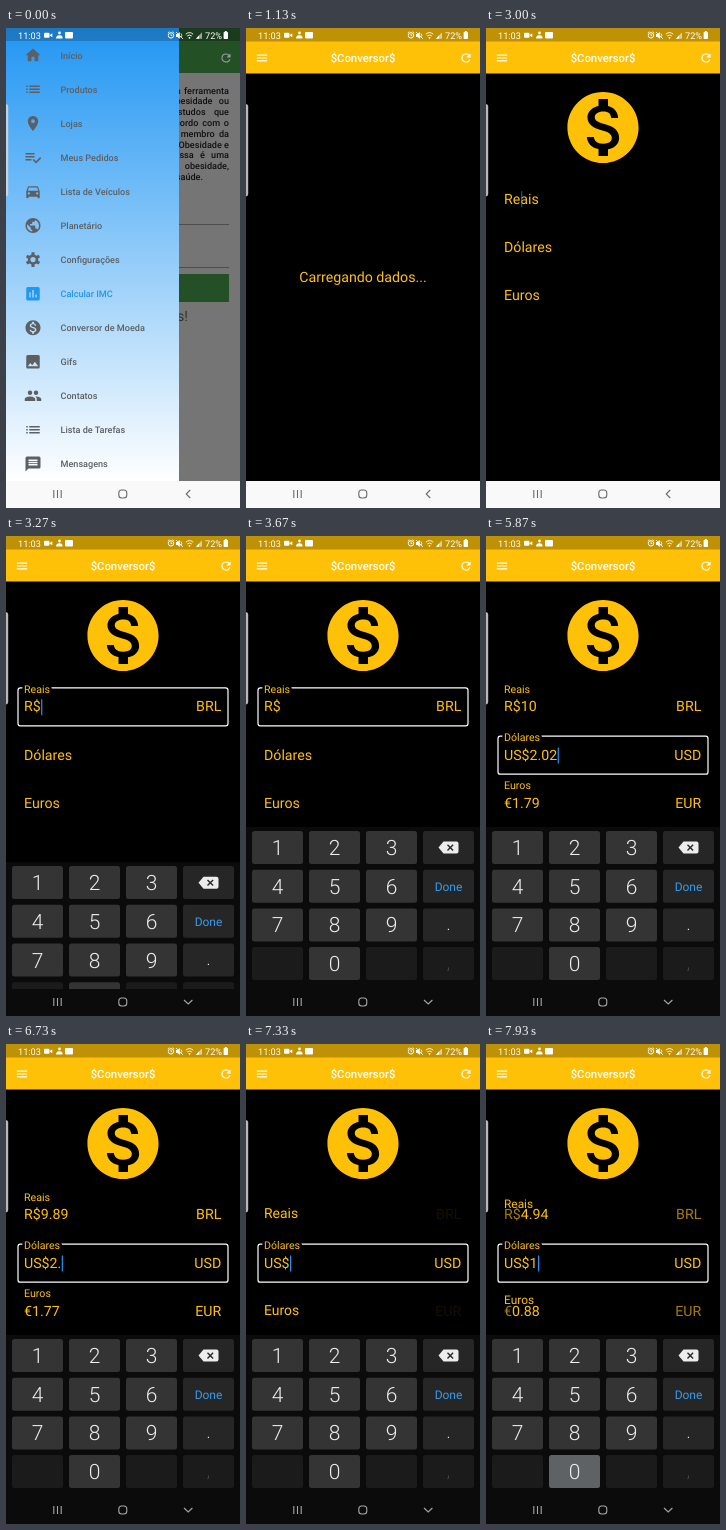
Write an HTML page that moves like this. It is 234 px wide and 480 px high and loops after 8000 ms.

```html
<!DOCTYPE html>
<html lang="pt">
<head>
<meta charset="utf-8">
<title>Conversor</title>
<style>
  html, body { margin: 0; width: 100%; height: 100%; overflow: hidden; background: #000; }
  svg { display: block; width: 100vw; height: 100vh; }
  text { font-family: Roboto, "Noto Sans", sans-serif; text-rendering: geometricPrecision; }
  .mid { text-anchor: middle; }
  .end { text-anchor: end; }
  .med { font-weight: 500; }
  .light { font-weight: 300; }
  .field text { fill: #ffc107; font-size: 14.2px; }
  .field .label { stroke: #000; stroke-width: 5px; stroke-linejoin: round; paint-order: stroke; }
  .hide { display: none; }
</style>
</head>
<body>
<svg id="stage" viewBox="0 0 234 480"></svg>
<script>
const LOOP = 8000, FPS = 15;
const AMBER = '#ffc107', BLUE = '#2196f3';

const listIcon = 'M3 11h2v2H3zM3 15h2v2H3zM3 7h2v2H3zM7 11h14v2H7zM7 15h14v2H7zM7 7h14v2H7z';
const coinIcon = 'M12 2C6.48 2 2 6.48 2 12s4.48 10 10 10 10-4.48 10-10S17.52 2 12 2zm1.41 16.09V20h-2.67v-1.93c-1.71-.36-3.16-1.46-3.27-3.4h1.96c.1 1.05.82 1.87 2.65 1.87 1.96 0 2.4-.98 2.4-1.59 0-.83-.44-1.61-2.67-2.14-2.48-.6-4.18-1.62-4.18-3.67 0-1.72 1.39-2.84 3.11-3.21V4h2.67v1.95c1.86.45 2.79 1.86 2.85 3.39H14.3c-.05-1.11-.64-1.87-2.22-1.87-1.5 0-2.4.68-2.4 1.64 0 .84.65 1.39 2.67 1.91s4.18 1.39 4.18 3.91c-.01 1.83-1.38 2.83-3.12 3.16z';
const refreshIcon = 'M17.65 6.35A7.95 7.95 0 0 0 12 4a8 8 0 1 0 7.73 10h-2.08A6 6 0 1 1 12 6c1.66 0 3.14.69 4.22 1.78L13 11h7V4z';
const menuIcon = 'M3 16h18v2H3zM3 11h18v2H3zM3 6h18v2H3z';

const items = [
  ['Início', 'M10 20v-6h4v6h5v-8h3L12 3 2 12h3v8z'],
  ['Produtos', listIcon],
  ['Lojas', 'M12 2C8.13 2 5 5.13 5 9c0 5.25 7 13 7 13s7-7.75 7-13c0-3.87-3.13-7-7-7zm0 9.5a2.5 2.5 0 0 1 0-5 2.5 2.5 0 0 1 0 5z'],
  ['Meus Pedidos', 'M2 10h12v2H2zM2 6h12v2H2zM2 14h8v2H2zM21.5 11.5L23 13l-7 7-4.5-4.5L13 14l3 3z'],
  ['Lista de Veículos', 'M3 12l2.1-6Q5.5 5 6.5 5h11q1 0 1.4 1L21 12v8q0 1-1 1h-1q-1 0-1-1v-1H6v1q0 1-1 1H4q-1 0-1-1zM5 11h14l-1.5-4.5h-11zM5 14.5a1.5 1.5 0 0 0 3 0 1.5 1.5 0 0 0-3 0zM16 14.5a1.5 1.5 0 0 0 3 0 1.5 1.5 0 0 0-3 0z'],
  ['Planetário', 'M12 2C6.48 2 2 6.48 2 12s4.48 10 10 10 10-4.48 10-10S17.52 2 12 2zm-1 17.93c-3.95-.49-7-3.85-7-7.93 0-.62.08-1.21.21-1.79L9 15v1c0 1.1.9 2 2 2zm6.9-2.54c-.26-.81-1-1.39-1.9-1.39h-1v-3c0-.55-.45-1-1-1H8v-2h2c.55 0 1-.45 1-1V7h2c1.1 0 2-.9 2-2v-.41c2.93 1.19 5 4.06 5 7.41 0 2.08-.8 3.97-2.1 5.39z'],
  ['Configurações', gearPath()],
  ['Calcular IMC', 'M19 3H5q-2 0-2 2v14q0 2 2 2h14q2 0 2-2V5q0-2-2-2zM9 17H7v-7h2zM13 17h-2V7h2zM17 17h-2v-4h2z'],
  ['Conversor de Moeda', coinIcon],
  ['Gifs', 'M21 19V5q0-2-2-2H5q-2 0-2 2v14q0 2 2 2h14q2 0 2-2zM8.5 13.5l2.5 3 3.5-4.5 4.5 6H5z'],
  ['Contatos', 'M13 8a3 3 0 1 1 6 0 3 3 0 0 1-6 0zM5 8a3 3 0 1 1 6 0 3 3 0 0 1-6 0zM8 13c-2.33 0-7 1.17-7 3.5V19h14v-2.5c0-2.33-4.67-3.5-7-3.5zM16 13l-1 .05c1.16.84 2 1.97 2 3.45V19h6v-2.5c0-2.33-4.67-3.5-7-3.5z'],
  ['Lista de Tarefas', listIcon],
  ['Mensagens', 'M20 2H4q-2 0-2 2v18l4-4h14q2 0 2-2V4q0-2-2-2zM18 14H6v-2h12zM18 11H6V9h12zM18 8H6V6h12z']
];

const about = [['é uma ferramenta', 1], ['obesidade ou', 4], ['estudos que', 6], ['acordo com o', 1.5],
  ['membro da', 2], ['Obesidade e', 0], ['Essa é uma', 4], ['obesidade,', 0]];

const fields = [
  { label: 'Reais', prefix: 'R$', suffix: 'BRL', floats: [3000, 7200, 7850] },
  { label: 'Dólares', prefix: 'US$', suffix: 'USD', floats: [4260] },
  { label: 'Euros', prefix: '€', suffix: 'EUR', floats: [4260, 7200, 7850] }
];

const values = [
  [0, '', '', ''], [4260, '1', '0.20', '0.18'], [4460, '10', '2.02', '1.79'],
  [6530, '9.89', '2.0', '1.77'], [6660, '9.89', '2.', '1.77'], [6860, '9.89', '2', '1.77'],
  [7200, '', '', ''], [7850, '4.94', '1', '0.88']
];

const caret = [[0, 0], [3000, .6], [3060, 1], [3660, 0], [4260, 1], [4860, 0], [5400, 1], [6200, 0], [6460, 1]];

const presses = [['1', 4130, 4260], ['0', 4330, 4460], ['del', 6460, 6530], ['del', 6600, 6660],
  ['del', 6800, 6860], ['del', 7130, 7200], ['1', 7730, 7860], ['0', 7930, 8000]];

const keys = ['1', '2', '3', 'del', '4', '5', '6', 'Done', '7', '8', '9', '.', '', '0', '', ','];

function gearPath() {
  let d = '';
  for (let i = 0; i < 6; i++) {
    [[-.3, 7], [-.2, 10], [.2, 10], [.3, 7]].forEach(([a, r]) => {
      const ang = i * Math.PI / 3 + a;
      d += (d ? 'L' : 'M') + (12 + r * Math.sin(ang)).toFixed(2) + ' ' + (12 - r * Math.cos(ang)).toFixed(2);
    });
  }
  return d + 'zM8.5 12a3.5 3.5 0 0 0 7 0 3.5 3.5 0 0 0-7 0z';
}

const rect = (x, y, w, h, fill, more = '') =>
  `<rect x="${x}" y="${y}" width="${w}" height="${h}" fill="${fill}" ${more}/>`;
const text = (x, y, str, size, fill, more = '') =>
  `<text x="${x}" y="${y}" font-size="${size}" fill="${fill}" ${more}>${str}</text>`;
const icon = (cx, cy, size, d, fill) =>
  `<path d="${d}" fill="${fill}" fill-rule="evenodd" transform="translate(${cx - size / 2} ${cy - size / 2}) scale(${size / 24})"/>`;
const line = (d, color, w) =>
  `<path d="${d}" fill="none" stroke="${color}" stroke-width="${w}"/>`;

function drawerPage() {
  const rowY = i => 27.3 + i * 34.05;
  return rect(0, 0, 234, 453, '#757575')
    + rect(0, 0, 234, 45, '#235025') + rect(0, 0, 234, 13, '#1a3c1c')
    + icon(220, 30, 13.7, refreshIcon, '#9a9a9a')
    + about.map(([s, gap], i) => text(223, 65.5 + i * 10.8, s, 9.1, '#111', `class="end med" style="word-spacing:${gap}px"`)).join('')
    + text(197, 152, 'saúde.', 9.1, '#111', 'class="end med"')
    + rect(160, 196, 63, .8, '#444') + rect(160, 239, 63, .8, '#444')
    + rect(160, 246, 63, 28, '#235025')
    + text(182, 293, 'dados!', 14.2, '#333', 'class="end"')
    + rect(0, 0, 173, 453, 'url(#sky)') + rect(0, 0, 173, 13, '#000', 'opacity=".2"')
    + '<g clip-path="url(#row)"><circle id="ripple" cx="95" cy="300" fill="#000"/></g>'
    + items.map(([name, d], i) => {
      const color = i === 7 ? BLUE : '#5c6064';
      return icon(27, rowY(i), 18, d, color) + text(54.5, rowY(i) + 3.2, name, 9.1, color, 'class="med"');
    }).join('');
}

function fieldMarkup(f, i) {
  const y = 170.2 + i * 48.3;
  return `<g class="field">
    <rect class="border" x="12" y="${y - 18.3}" width="210" height="38" rx="2.3" fill="none" stroke="#fff" stroke-width="1.2"/>
    <text class="label" x="18">${f.label}</text>
    <text class="value" x="18" y="${y + 5}"><tspan class="unit">${f.prefix}</tspan><tspan class="num"></tspan></text>
    <text class="unit end" x="215.3" y="${y + 5}">${f.suffix}</text>
    <rect class="caret" y="${y - 7}" width="1.2" height="16" fill="${BLUE}"/></g>`;
}

function converterPage() {
  return rect(0, 0, 234, 453, '#000') + rect(0, 0, 234, 45.5, AMBER) + rect(0, 0, 234, 13.5, '#bf9105')
    + icon(16, 30, 13.7, menuIcon, '#fff') + icon(220, 30, 13.7, refreshIcon, '#fff')
    + text(117, 33.7, '$Conversor$', 11.3, '#fff', 'class="mid med"')
    + text(117, 254, 'Carregando dados...', 14.2, AMBER, 'class="mid" id="loading"')
    + '<g id="form">' + icon(117, 99.5, 85.4, coinIcon, AMBER) + fields.map(fieldMarkup).join('') + '</g>';
}

function keyMarkup(k, i) {
  const x = 6 + (i % 4) * 57, y = 295 + Math.floor(i / 4) * 38.7, cx = x + 25.5, cy = y + 16.6;
  const digit = k !== '' && '0123456789'.includes(k);
  const base = digit ? '#343434' : 'delDone.'.includes(k) && k ? '#262626' : '#1b1b1b';
  let face = '';
  if (k === 'del') {
    face = `<path d="M${cx - 10} ${cy}l5-6h13q2 0 2 2v8q0 2-2 2h-13z" fill="#ececec"/>`
      + line(`M${cx - 1} ${cy - 2.8}l5.6 5.6m0-5.6l-5.6 5.6`, '#262626', 1.4);
  } else if (k === 'Done') face = text(cx, cy + 4.3, k, 12, '#389bec', 'class="mid"');
  else if (digit) face = text(cx, cy + 7.4, k, 21, '#eee', 'class="mid light"');
  else if (k) face = text(cx, cy + 5, k, 17, k === ',' ? '#4a4a4a' : '#eee', 'class="mid light"');
  return rect(x, y, 51, 33, base, `rx="2.5" class="key" data-key="${k}" data-base="${base}"`) + face;
}

function navBar(id, bg, color, back) {
  return `<g id="${id}">` + rect(0, 453, 234, 27, bg)
    + line('M47.8 462v8M51.5 462v8M55.2 462v8', color, 1.1)
    + `<rect x="112.8" y="462" width="8" height="8" rx="3" fill="none" stroke="${color}" stroke-width="1.1"/>`
    + line(back, color, 1.1) + '</g>';
}

function statusBar() {
  const w = '#fff';
  return text(12, 10.8, '11:03', 9.2, w)
    + rect(38, 4.8, 5.5, 5, w, 'rx="1"') + `<path d="M43.5 7.3l2.8-2v4z" fill="${w}"/>`
    + `<circle cx="53.5" cy="5" r="1.4" fill="${w}"/>` + `<path d="M50 10.6q0-3.4 3.5-3.4t3 3.4z" fill="${w}"/>`
    + rect(59, 4, 8, 6.6, w, 'rx="1"')
    + `<circle cx="165" cy="7.4" r="2.7" fill="none" stroke="${w}"/>` + line('M165 5.8v1.8h1.3M161.8 5l1.6-1.4M168.2 5l-1.6-1.4', w, .8)
    + `<path d="M170 6h1.6l2.2-2v7l-2.2-2H170z" fill="${w}"/>` + line('M170 4l7 7M175 5.5q1.6 2 0 4', w, .8)
    + line('M179.8 6.2q3.7-3.2 7.4 0M181.2 8q2.3-2 4.6 0', w, .9) + `<circle cx="183.5" cy="9.8" r=".9" fill="${w}"/>`
    + `<path d="M190 10.8l6-6.6v6.6z" fill="${w}" opacity=".55"/><path d="M190 10.8l3-3.3v3.3z" fill="${w}"/>`
    + text(199, 10.8, '72%', 9.2, w)
    + rect(217.6, 4, 4.4, 7, w, 'rx=".7"') + rect(218.8, 3, 2, 1.2, w);
}

const stage = document.getElementById('stage');
stage.innerHTML = `<defs>
    <linearGradient id="sky" x2="0" y2="1"><stop stop-color="${BLUE}"/><stop offset="1" stop-color="#fff"/></linearGradient>
    <clipPath id="row">${rect(0, 282.7, 173, 34, '#000')}</clipPath></defs>`
  + `<g id="drawer">${drawerPage()}</g><g id="converter">${converterPage()}</g>`
  + rect(-4, 76, 6.2, 92.5, '#d8d8d8', 'rx="2.4" opacity=".85"')
  + `<g id="keyboard">${rect(0, 291, 234, 190, '#0b0b0b')}${keys.map(keyMarkup).join('')}</g>`
  + navBar('navLight', '#f9f9f9', '#6b6b6b', 'M184.2 462l-4 4 4 4')
  + navBar('navDark', '#0b0b0b', '#a5a5a5', 'M178 464l4.2 4 4.2-4')
  + statusBar();

const $ = id => document.getElementById(id);
const show = (id, on) => $(id).classList.toggle('hide', !on);
const clamp = v => Math.min(1, Math.max(0, v));
const ramp = (t, from, ms) => ease(clamp((t - from) / ms));
const latest = (list, t) => list.filter(e => e[0] <= t).pop();

// cubic-bezier(.4, 0, .2, 1)
function ease(x) {
  let lo = 0, hi = 1, s = .5;
  for (let i = 0; i < 18; i++) {
    s = (lo + hi) / 2;
    const bx = 1.2 * s * (1 - s) ** 2 + .6 * s * s * (1 - s) + s ** 3;
    if (bx < x) lo = s; else hi = s;
  }
  return s * s * (3 - 2 * s);
}

// The times alternate between label rising and label sinking.
function floatAmount(times, t) {
  const past = times.filter(v => v <= t);
  if (!past.length) return 0;
  const p = ramp(t, past[past.length - 1], 200);
  return past.length % 2 ? p : 1 - p;
}

const fieldEls = [...document.querySelectorAll('.field')];
const keyEls = [...document.querySelectorAll('.key')];

function drawField(g, i, t) {
  const y = 170.2 + i * 48.3, p = floatAmount(fields[i].floats, t);
  const find = c => g.querySelector('.' + c);
  const moved = ramp(t, 5700, 180);
  const focus = [ramp(t, 3000, 180) - moved, moved, 0][i];
  find('border').style.opacity = focus;
  const label = find('label');
  label.style.fontSize = 14.2 - 3.55 * p + 'px';
  label.setAttribute('y', y + 5.6 - 19 * p);
  g.querySelectorAll('.unit').forEach(u => u.style.fillOpacity = p);
  find('num').textContent = latest(values, t)[i + 1];
  const bar = find('caret'), active = i === (t < 5700 ? 0 : 1);
  bar.setAttribute('x', 18.4 + find('value').getComputedTextLength());
  bar.style.opacity = active ? latest(caret, t)[1] : 0;
}

function render(t) {
  const inDrawer = t < 1130, loaded = t >= 2060;
  show('drawer', inDrawer);
  show('converter', !inDrawer);
  show('loading', !loaded);
  show('form', loaded);

  const r = clamp((t - 200) / 400);
  $('ripple').setAttribute('r', 130 * ease(r));
  $('ripple').style.opacity = .14 * Math.min(1, 3 * (1 - r));

  if (loaded) fieldEls.forEach((g, i) => drawField(g, i, t));

  const up = ramp(t, 3130, 270);
  show('keyboard', t > 3130);
  $('keyboard').setAttribute('transform', `translate(0 ${162 * (1 - up)})`);
  show('navLight', t < 3190);
  show('navDark', t >= 3190);
  const down = presses.filter(([, a, b]) => t >= a && t < b).map(e => e[0]);
  keyEls.forEach(k => k.setAttribute('fill', down.includes(k.dataset.key) ? '#5e6264' : k.dataset.base));
}

function tick() {
  const n = Math.floor((performance.now() % LOOP) * FPS / 1000 + .1);
  render(n % (LOOP * FPS / 1000) * 1000 / FPS);
  requestAnimationFrame(tick);
}
tick();
</script>
</body>
</html>
```
